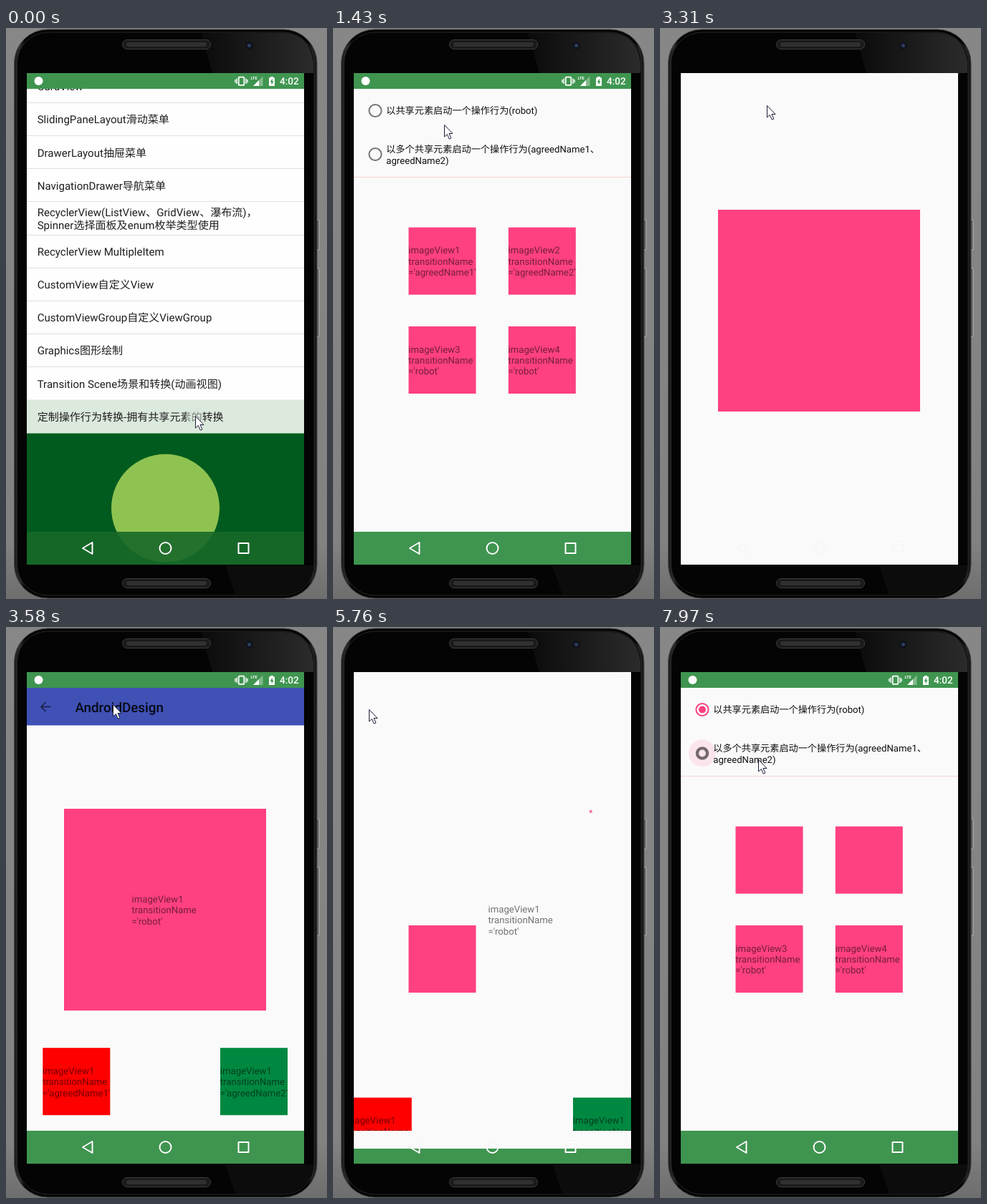
Animation of 448 by 798 pixels, one loop 8 s. Source, as an HTML page:

```html
<!DOCTYPE html>
<html lang="zh-CN">
<head>
<meta charset="utf-8">
<title>Shared element transition</title>
<style>
html, body { margin: 0; width: 100%; height: 100%; overflow: hidden; background: #848484; }
svg { display: block; width: 100%; height: 100%; }
text { font-family: Roboto, "Noto Sans CJK SC", "Noto Sans CJK", sans-serif; font-size: 13.17px; text-rendering: geometricPrecision; }
.row { font-size: 15.05px; fill: #1f1f1f; }
.opt { fill: #111; }
.label { fill: #000; fill-opacity: .54; }
.title { font-size: 18.8px; font-weight: 500; fill: #000; fill-opacity: .87; }
.clock { font-size: 13.6px; font-weight: 500; fill: #fff; }
.lte { font-size: 5.6px; font-weight: 700; fill: #fff; }
</style>
</head>
<body>
<svg viewBox="0 0 448 798">
  <defs>
    <clipPath id="screen"><rect x="29" y="63" width="387" height="687"/></clipPath>
    <clipPath id="aboveNav"><rect x="29" y="63" width="387" height="641"/></clipPath>
    <clipPath id="cutStatus"><rect x="29" y="63" width="387" height="16"/></clipPath>
    <linearGradient id="wall" x2="0" y2="1">
      <stop stop-color="#878787"/><stop offset=".9" stop-color="#828282"/><stop offset="1" stop-color="#6e6e6e"/>
    </linearGradient>
    <linearGradient id="gloss">
      <stop stop-color="#0b0b0b"/><stop offset="1" stop-color="#2b2b2b"/>
    </linearGradient>
    <linearGradient id="rim">
      <stop stop-color="#1c1c1c"/><stop offset=".02" stop-color="#2c2c2c"/><stop offset=".035" stop-color="#040404"/>
      <stop offset=".97" stop-color="#040404"/><stop offset=".985" stop-color="#242424"/><stop offset="1" stop-color="#141414"/>
    </linearGradient>
  </defs>
  <rect width="448" height="798" fill="url(#wall)"/>
  <rect x="433.500" y="268" width="3.500" height="42" rx="1" fill="#5b5b5b" stroke="#c8c8c8" stroke-width=".8"/>
  <rect x="433.500" y="336" width="3.500" height="95" rx="1" fill="#5b5b5b" stroke="#c8c8c8" stroke-width=".8"/>
  <rect x="11.500" y="2" width="422.500" height="795" rx="47" fill="url(#rim)" stroke="#444"/>
  <rect x="15.500" y="6" width="414.500" height="787" rx="43" fill="#040404" stroke="#262626"/>
  <path d="M272 7H388Q424 9 429 48V63H288Z" fill="url(#gloss)"/>
  <path d="M306 751H429Q426 786 388 792H320Z" fill="#0c0c0c"/>
  <g fill="#1a1a1a" stroke="#3e3e3e">
    <rect x="162.500" y="16.500" width="123" height="13" rx="6.500"/>
    <rect x="162.500" y="769.500" width="123" height="13" rx="6.500"/>
  </g>
  <g fill="#303030">
    <rect x="168" y="20" width="112" height="6" rx="3"/>
    <rect x="168" y="773" width="112" height="6" rx="3"/>
  </g>
  <circle cx="339.500" cy="24.500" r="5.500" fill="#10131a"/>
  <circle cx="339.500" cy="24.500" r="2.500" fill="#2c3e60"/>
  <g id="stage" clip-path="url(#screen)"></g>
</svg>
<script>
const LOOP = 8000;
const GREEN = '#3f9550', PINK = '#ff4081', PAPER = '#fafafa', GREY = '#757575';

// Each step changes part of the state and holds until the next one.
const STEPS = [
  [0, { view: 'list', x: 264, y: 542, tap: 1, drop: 687, burst: 0, r1: 'off', r2: 'off', hide: '' }],
  [140, { tap: 0 }],
  [260, { x: 262, y: 549 }],
  [390, { x: 258, y: 557 }],
  [530, { x: 254, y: 562, drop: 520 }],
  [650, { x: 249, y: 567, drop: 300 }],
  [780, { x: 246, y: 570, drop: 123 }],
  [920, { x: 240, y: 550, drop: 44 }],
  [1040, { x: 222, y: 490, drop: 14 }],
  [1160, { x: 204, y: 440, drop: 3 }],
  [1280, { view: 'options', x: 194, y: 413, drop: 0 }],
  [1430, { x: 155, y: 135 }],
  [1550, { x: 156, y: 75 }],
  [1700, { x: 153, y: 95 }],
  [1830, { x: 150, y: 106 }],
  [1970, { x: 149, y: 108 }],
  [2500, { tap: 1 }],
  [2650, { hide: '3' }],
  [2770, { tap: 0, r1: 'press' }],
  [2890, { r1: 'fill' }],
  [3030, { burst: 1 }],
  [3160, { view: 'detail', burst: 3, pink: [98, 352, 160], label: null }],
  [3310, { pink: [81, 254, 282] }],
  [3460, { burst: .3, label: [175.5, 384.7] }],
  [3580, { burst: 0 }],
  [4200, { x: 147, y: 110 }],
  [4320, { x: 137, y: 118 }],
  [4470, { x: 105, y: 121 }],
  [4590, { x: 74, y: 123 }],
  [4740, { x: 60, y: 118 }],
  [4870, { x: 50, y: 115 }],
  [5460, { tap: 1 }],
  [5610, { tap: 0, label: null }],
  [5760, { burst: 1, pink: [105.5, 417, 94], label: [216.5, 399], speck: 1 }],
  [5880, { view: 'options', burst: 0, r1: 'on', hide: '3' }],
  [6030, { hide: '' }],
  [6460, { x: 70, y: 130 }],
  [6580, { x: 112, y: 165 }],
  [6700, { x: 137, y: 185 }],
  [7690, { tap: 1 }],
  [7820, { hide: '12' }],
  [7970, { tap: 0, r2: 'press' }]
];

const ROWS = ['CardView', 'SlidingPaneLayout滑动菜单', 'DrawerLayout抽屉菜单', 'NavigationDrawer导航菜单',
  ['RecyclerView(ListView、GridView、瀑布流)，', 'Spinner选择面板及enum枚举类型使用'],
  'RecyclerView MultipleItem', 'CustomView自定义View', 'CustomViewGroup自定义ViewGroup',
  'Graphics图形绘制', 'Transition Scene场景和转换(动画视图)', '定制操作行为转换-拥有共享元素的转换'];
const ROW_H = 46.15;

const rect = (x, y, w, h, fill) => `<rect x="${x}" y="${y}" width="${w}" height="${h}" fill="${fill}"/>`;
const disc = (x, y, r, fill) => `<circle cx="${x}" cy="${y}" r="${r}" fill="${fill}"/>`;
const ring = (x, y, r, color, w) => `<circle cx="${x}" cy="${y}" r="${r}" fill="none" stroke="${color}" stroke-width="${w}"/>`;
const text = (cls, x, y, s) => `<text class="${cls}" x="${x}" y="${y}">${s}</text>`;
const move = (x, y, body) => `<g transform="translate(${x} ${y})">${body}</g>`;
const clip = (id, body) => `<g clip-path="url(#${id})">${body}</g>`;

const label = (x, y, n, name) =>
  ['imageView' + n, 'transitionName', `='${name}'`].map((s, i) => text('label', x, y + i * 15.45, s)).join('');

const tile = (x, y, fill, n, name, shown = true) =>
  rect(x, y, 94, 94, fill) + (shown ? label(x - .2, y + 36.5, n, name) : '');

function radio(x, y, mode) {
  const halo = disc(x, y, 19, '#fbe5ec');
  if (mode === 'press') return halo + ring(x, y, 7.1, '#76696e', 4.4);
  if (mode === 'fill') return halo + disc(x, y, 9, '#8f8388') + disc(x, y, 7.2, '#75696d');
  if (mode === 'on') return ring(x, y, 8.6, PINK, 2) + disc(x, y, 5, PINK);
  return ring(x, y, 8.6, GREY, 2);
}

function list() {
  let out = rect(29, 63, 387, 687, '#fefefe') + rect(29, 519.5, 387, 47.5, '#dce9dd');
  ROWS.forEach((row, i) => {
    const y = Math.round(87.2 + i * ROW_H);
    if (Array.isArray(row)) out += text('row', 43.7, y - 9, row[0]) + text('row', 43.7, y + 9, row[1]);
    else out += text('row', 43.7, y, row);
    if (i < 9) out += rect(29, Math.round(104 + i * ROW_H), 387, 1, '#e0e0e0');
  });
  return out + rect(29, 566.5, 387, 183.5, '#015b1e') + disc(222.5, 671, 75.5, '#8fc351') +
    rect(29, 704, 387, 46, 'rgba(24,105,42,.9)') + rect(29, 63, 387, 22, GREEN);
}

function options(s) {
  const k = s.burst;
  const shown = n => !s.hide.includes(n);
  return rect(29, 63, 387, 687, PAPER) +
    rect(29 + k, 63, 387, 22 - 6 * k, GREEN) +
    rect(29 + 2 * k, 704 + 8 * k, 387, 46, GREEN) +
    rect(29 + k, 208 - 7 * k, 387, 1, s.drop ? '#d9d9d9' : '#f6d3cf') +
    move(0, -12 * k, radio(59, 115.5, s.r1) + text('opt', 74.3, 120.4, '以共享元素启动一个操作行为(robot)')) +
    move(2 * k, -8.5 * k, radio(59, 176.5, s.r2) +
      text('opt', 74.3, 174.4, '以多个共享元素启动一个操作行为(agreedName1、') + text('opt', 74.3, 189.5, 'agreedName2)')) +
    move(0, -3 * k, tile(105.5, 278.7, PINK, 1, 'agreedName1', shown('1'))) +
    move(3 * k, -3 * k, tile(244.8, 278.7, PINK, 2, 'agreedName2', shown('2'))) +
    tile(105.5, 417, PINK, 3, 'robot', shown('3')) +
    move(2.3 * k, 0, tile(244.8, 417, PINK, 4, 'robot', shown('4')));
}

function detail(s) {
  const k = s.burst, [px, py, size] = s.pink;
  const arrow = '<path d="M62.500 111.500H49M55.500 105L49 111.500L55.500 118" fill="none" stroke="#000" stroke-opacity=".6" stroke-width="1.700"/>';
  const bar = rect(29, 85, 387, 52.5, '#3f51b5') + arrow + text('title', 96.5, 118.7, 'AndroidDesign');
  const body = move(0, -150 * k, bar) + rect(px, py, size, size, PINK) +
    (s.label ? label(...s.label, 1, 'robot') : '') +
    move(-35.5 * k, 69.5 * k, tile(51.3, 588.2, '#f00', 1, 'agreedName1')) +
    move(36 * k, 69.5 * k, tile(299, 588.2, '#008840', 1, 'agreedName2')) +
    (s.speck ? rect(358, 256, 3.6, 3.6, '#ff6f9f') : '');
  return rect(29, 63, 387, 687, PAPER) + clip('aboveNav', body) +
    rect(29, 63 - 75 * k, 387, 22, GREEN) + rect(29, 704 + 25 * k, 387, 46, GREEN);
}

const statusIcons = disc(45.5, 74, 6, '#fff') +
  '<g fill="none" stroke="#fff"><rect x="324.700" y="68.700" width="7.600" height="11.200" rx="1" stroke-width="1.800"/>' +
  '<path d="M322 70.500V78M335 70.500V78M319.900 72V76.500M337 72V76.500" stroke-width="1.400"/></g>' +
  text('lte', 341.6, 72.2, 'LTE') +
  '<path d="M345 81L358.500 67.500V81Z" fill="#fff" fill-opacity=".35"/><path d="M345 81L353 73V81Z" fill="#fff"/>' +
  '<path d="M367 69.500H369V68H373V69.500H375V81H367Z" fill="#fff"/>' +
  `<path d="M371.800 70.800L368.600 75.800H370.600V79.500L373.600 74.500H371.800Z" fill="${GREEN}"/>` +
  text('clock', 382, 79, '4:02');

const NAV_SHAPES = '<path d="M107 727L120.500 719V735Z"/><circle cx="222.500" cy="727" r="8"/>' +
  '<rect x="324.500" y="720" width="14" height="14"/>';
const navIcons = [['#000', .1, 2.6], ['#fff', 1, 2]].map(([c, a, w]) =>
  `<g fill="none" stroke="${c}" stroke-opacity="${a}" stroke-width="${w}" stroke-linejoin="round">${NAV_SHAPES}</g>`).join('');

const pointer = s => (s.tap ? disc(s.x - 1, s.y, 12.5, 'rgba(215,230,220,.5)') : '') +
  move(s.x + .5, s.y + .5, '<path d="M0 0V16.500L3.800 13L6.800 19.600L9.400 18.400L6.500 12H11.500Z" fill="#fff" stroke="#1d1d3a"/>');

// The status icons leave with their bar when the views fly apart.
function status(s) {
  if (!s.burst || s.view === 'list') return statusIcons;
  if (s.view === 'options') return clip('cutStatus', statusIcons);
  return s.burst < 1 ? statusIcons : '';
}

function scene(s) {
  let out;
  if (s.view === 'list') out = list() + (s.drop < 687 ? move(0, s.drop, options(s)) : '');
  else out = s.view === 'options' ? options(s) : detail(s);
  return out + status(s) + navIcons + pointer(s);
}

const stage = document.getElementById('stage');
const start = performance.now();
let current = -1;

function tick() {
  const t = (performance.now() - start) % LOOP;
  const n = STEPS.filter(([at]) => at <= t).length;
  if (n !== current) {
    current = n;
    stage.innerHTML = scene(Object.assign({}, ...STEPS.slice(0, n).map(step => step[1])));
  }
  requestAnimationFrame(tick);
}
tick();
</script>
</body>
</html>
```
